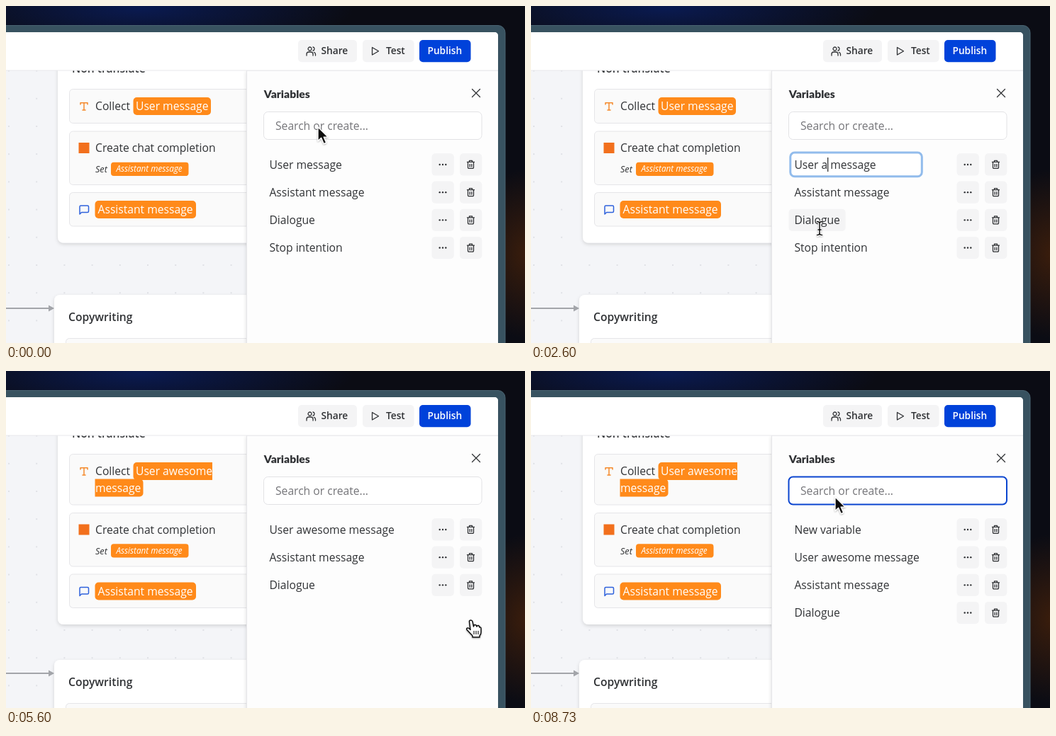
An HTML page that plays this animation: 732x476 px, repeating every 8.79 s.

```html
<!DOCTYPE html>
<html lang="en">
<head>
<meta charset="utf-8">
<title>Variables panel</title>
<style>
  html, body { margin: 0; width: 100%; height: 100%; overflow: hidden; background: #0b0c14; }
  svg { display: block; width: 100%; height: 100%; }
  text { font: 15.66px "Open Sans", sans-serif; fill: #303235; white-space: pre; }
  .bold { font-weight: 600; }
  .button { font-size: 13.7px; font-weight: 600; }
  .heading { font: 900 15.7px Lato, sans-serif; }
  .hint { fill: #757579; }
  .white { fill: #fff; }
  .set { font-size: 12.7px; font-style: italic; }
  .tag { font-size: 11.75px; font-style: italic; }
  .icon { fill: none; stroke: #303235; stroke-width: 1.3; stroke-linecap: round; stroke-linejoin: round; }
  .soft { fill: #f4f4f5; }
  .chip { fill: #ff8a1a; }
  .block { fill: #fafafa; stroke: #e5e5e8; }
  .primary { fill: #0042da; }
</style>
</head>
<body>
<svg viewBox="0 0 732 476" preserveAspectRatio="none">
  <defs>
    <radialGradient id="blueGlow">
      <stop offset="0" stop-color="#0a1a50"/>
      <stop offset="1" stop-color="#0a1a50" stop-opacity="0"/>
    </radialGradient>
    <radialGradient id="brownGlow">
      <stop offset="0" stop-color="#3a1d0c"/>
      <stop offset="1" stop-color="#3a1d0c" stop-opacity="0"/>
    </radialGradient>
    <pattern id="dots" x="3" y="365" width="39.2" height="39.2" patternUnits="userSpaceOnUse">
      <circle cx="1" cy="1" r="1" fill="#d9dbe0"/>
    </pattern>
    <clipPath id="page"><path d="M0 37H689a5 5 0 0 1 5 5V476H0z"/></clipPath>
    <filter id="shadow" x="-10%" y="-10%" width="120%" height="125%">
      <feDropShadow dx="0" dy="2" stdDeviation="2.5" flood-color="#000" flood-opacity=".14"/>
    </filter>
    <filter id="cursorShadow" x="-50%" y="-50%" width="200%" height="200%">
      <feDropShadow dx="0" dy="1" stdDeviation="1" flood-color="#000" flood-opacity=".35"/>
    </filter>
  </defs>

  <rect width="732" height="476" fill="#0b0c14"/>
  <ellipse cx="190" cy="4" rx="300" ry="60" fill="url(#blueGlow)"/>
  <ellipse cx="735" cy="350" rx="90" ry="120" fill="url(#brownGlow)"/>
  <path d="M-2 27.5H694a10 10 0 0 1 10 10V478H-2z" fill="#385260" stroke="#4a6472"/>

  <g clip-path="url(#page)">
    <rect y="37" width="694" height="439" fill="#f4f5f8"/>
    <rect y="91" width="340" height="385" fill="url(#dots)"/>
    <g id="flow"></g>
    <rect x="339.5" y="91" width="360" height="390" fill="#fdfdfd" stroke="#e6e6e9" filter="url(#shadow)"/>
    <path d="M0 37H694V91H0z" fill="#fff"/>
    <path d="M0 91H694" stroke="#e8e8eb"/>
    <g id="header"></g>
    <text class="heading" x="363.8" y="130">Variables</text>
    <path class="icon" stroke-width="1.5" d="M657.5 117.5l11 11m0 -11l-11 11"/>
    <g id="panel"></g>
  </g>
  <g id="cursor" filter="url(#cursorShadow)"></g>
</svg>

<script>
const LOOP = 8790, FRAME = 1000 / 15;
const ROW_TOP = 208.3, ROW_STEP = 39.2, BUTTON = 31.3;
const $ = id => document.getElementById(id);

const rect = (x, y, w, h, cls, r = 5, extra = '') =>
  `<rect x="${x}" y="${y}" width="${w}" height="${h}" rx="${r}" class="${cls}" ${extra}/>`;
const label = (x, y, str, cls = '') => `<text x="${x}" y="${y}" class="${cls}">${str}</text>`;
const icon = (x, y, d, extra = '') => `<path class="icon" transform="translate(${x} ${y})" d="${d}" ${extra}/>`;

const pen = document.createElement('canvas').getContext('2d');
function textWidth(str) {
  pen.font = '15.66px "Open Sans", sans-serif';
  return pen.measureText(str).width;
}

// Times of the things the user does
const CLICK_NAME = 1450, COMMIT = 3670, DELETE = 5500, FOCUS = 6450, ENTER = 8150;
const INSERT = { text: ' awesome', start: 2350, step: 135 };
const CREATE = { text: 'New variable', start: 6740, step: 105 };

const typedCount = (job, t) =>
  t < job.start ? 0 : Math.min(job.text.length, 1 + Math.floor((t - job.start) / job.step));
const lastKey = (job, t) => job.start + job.step * Math.max(0, typedCount(job, t) - 1);

function caret(x, y, t, since) {
  return (t - since) % 1060 < 530 ? `<path d="M${x} ${y - 10}v20" stroke="#222" stroke-width="1.2"/>` : '';
}

// Pointer path: start, end, from, to, easing
const inOut = p => p < .5 ? 4 * p ** 3 : 1 - (2 - 2 * p) ** 3 / 2;
const easeIn = p => p * p, easeOut = p => 1 - (1 - p) ** 3;
const MOVES = [
  [300, 1050, [440, 171], [407, 224], inOut],
  [1740, 2140, [407, 224], [407, 314], inOut],
  [3950, 4330, [407, 314], [428, 322], easeIn],
  [4330, 5050, [428, 322], [656, 352], easeOut],
  [5680, 6400, [656, 352], [427, 173], inOut],
  [8400, 8730, [427, 173], [429, 178], inOut]
];
function pointerAt(t) {
  let spot = MOVES[0][2];
  for (const [start, end, from, to, ease] of MOVES) {
    if (t < start) break;
    const p = ease(Math.min(1, (t - start) / (end - start)));
    spot = from.map((v, i) => v + (to[i] - v) * p);
  }
  return spot;
}

const at = (steps, t) => steps.filter(([time]) => time <= t).pop()[1];
const SHAPES = [[0, 'arrow'], [750, 'beam'], [3800, 'arrow'], [4800, 'hand'],
  [5680, 'arrow'], [6270, 'beam'], [8400, 'arrow']];
const HOVERS = [[0, ''], [750, 'User message'], [CLICK_NAME, ''], [1820, 'Assistant message'],
  [1880, 'Dialogue'], [4130, 'Stop intention'], [4530, '']];

const BEAM = 'M-4 -9.5Q0 -9.5 0 -7Q0 -9.5 4 -9.5M0 -7V7M-4 9.5Q0 9.5 0 7Q0 9.5 4 9.5M-2.5 2H2.5';
const CURSORS = {
  arrow: '<path d="M0 0V19.5L4.6 15.3 8.2 23.6 11.6 22.1 8.1 14.1H14z" fill="#111" stroke="#fff" stroke-width="1.3" stroke-linejoin="round"/>',
  beam: `<path d="${BEAM}" fill="none" stroke="#fff" stroke-width="3.6"/><path d="${BEAM}" fill="none" stroke="#111" stroke-width="1.5"/>`,
  hand: '<path d="M-2.5 2Q-2.5 0 -.5 0T2 2L3.5 9Q3.5 6.5 5.5 6.5T8 9Q8.3 7.3 10 7.5T11.7 10Q14 9 14 12V17Q14 20 12 22V24H2V22L-6 13.5Q-7 11.5 -5 11T-1 13.5z" fill="#fff" stroke="#111" stroke-width="1.5" stroke-linejoin="round"/><path d="M4 15v5M7 15v5M10 15v5" stroke="#111" stroke-width="1.1"/>'
};

function drawHeader() {
  $('header').innerHTML =
    rect(412, 48, 83, BUTTON, 'soft') + label(444.5, 68.3, 'Share', 'button') +
    icon(423, 57, 'M1 13v-2q0 -3 3 -3h3q3 0 3 3v2M5.5 6a2.5 2.5 0 1 1 .1 0M10 1q2 .4 2 2.5T10 6M11.5 8.3q2 .6 2 3V13') +
    rect(503, 48, 72.5, BUTTON, 'soft') + label(536, 68.3, 'Test', 'button') +
    icon(516, 58, 'M.5 .5L9.5 5.8 .5 11z') +
    rect(583, 48, 72.5, BUTTON, 'primary') + label(594.5, 68.3, 'Publish', 'button white');
}

function drawFlow(renamed) {
  const drop = renamed ? 23.5 : 0;
  const nameChip = renamed
    ? '<path class="chip" d="M291 129H184.500a5 5 0 0 0 -5 5V149a5 5 0 0 0 5 5H291z"/>' +
      '<path class="chip" d="M125.500 152.500H188.500a5 5 0 0 1 5 5V172.500a5 5 0 0 1 -5 5H125.500z"/>' +
      label(183, 147, 'User awesome', 'white') + label(126, 170.5, 'message', 'white')
    : rect(179.5, 129, 109.5, 25, 'chip') + label(183, 147, 'User message', 'white');

  $('flow').innerHTML =
    rect(73, 40, 330, 294.5 + drop, 'white', 8, 'filter="url(#shadow)"') +
    label(93, 94, 'Non translate', 'bold') +
    rect(89.5, 117.5, 300, 48 + drop, 'block') +
    icon(104.5, 136, 'M.5 3V.7H10.5V3M5.5 .7V11M3.5 11H7.500', 'style="stroke:#f58a2c;stroke-width:1.5"') +
    label(126, 147, 'Collect') + nameChip +
    `<g transform="translate(0 ${drop})">` +
    rect(89.5, 177, 300, 75.500, 'block') +
    rect(102.5, 193, 15, 15, '', 0, 'fill="#f2701d"') +
    label(126, 206, 'Create chat completion') +
    label(126, 235, 'Set', 'set') + rect(148, 220.7, 109.5, 19.3, 'chip', 4) +
    label(155.5, 234.3, 'Assistant message', 'tag white') +
    rect(89.5, 263.5, 300, 47.5, 'block') +
    icon(103.5, 281.5, 'M.5 12.500V2Q.5 .5 2 .5H11.500Q13 .5 13 2V8.500Q13 10 11.500 10H3z', 'style="stroke:#2f62dc;stroke-width:1.5"') +
    rect(125.5, 275, 142.5, 25, 'chip') + label(129.5, 293, 'Assistant message', 'white') +
    '</g>' +
    '<path d="M0 427H62" stroke="#a3a5aa" stroke-width="2"/><path d="M60 422.500L68 427 60 431.500z" fill="#a3a5aa"/>' +
    rect(68, 408, 330, 90, 'white', 8, 'filter="url(#shadow)"') +
    label(88, 445, 'Copywriting', 'bold') + rect(84.5, 469.5, 300, 40, 'block');
}

function drawSearch(t, typed) {
  const focused = t >= FOCUS, width = typed ? 261.5 : 307.5;
  const stroke = focused ? 'stroke="#0b45cf" stroke-width="2"' : 'stroke="#e2e2e5"';
  let out = rect(363.5, 149.5, width, 39, 'white', 6, stroke) +
    (typed ? label(380, 175, typed) : label(380, 175, 'Search or create...', 'hint'));
  if (focused) {
    const since = t >= ENTER ? ENTER : typed ? lastKey(CREATE, t) : FOCUS;
    out += caret(380.5 + textWidth(typed), 169, t, since);
  }
  if (typed) out += rect(632, 149, 39, 39.5, 'primary', 6) +
    '<path d="M646.500 169h10m-5 -5v10" stroke="#fff" stroke-width="1.5"/>';
  return out;
}

function drawRow(name, i, t) {
  const top = ROW_TOP + i * ROW_STEP, mid = top + BUTTON / 2;
  const editing = i === 0 && t >= CLICK_NAME && t < COMMIT;
  const trashHover = name === 'Stop intention' && t >= 4750;
  let out = '';
  if (at(HOVERS, t) === name) out += rect(363.5, top, textWidth(name) + 15.7, BUTTON, 'soft');
  if (editing) out += rect(365.8, top - 1.2, 185.5, BUTTON + 2.4, 'white', 6, 'stroke="#92bcec" stroke-width="3"');
  out += label(371.4, mid + 5.6, name);
  if (editing) {
    const n = typedCount(INSERT, t);
    const since = n ? lastKey(INSERT, t) : CLICK_NAME;
    out += caret(371.9 + textWidth('User' + INSERT.text.slice(0, n)), mid, t, since);
  }
  out += rect(600.5, top, BUTTON, BUTTON, 'soft') +
    [-4.3, 0, 4.3].map(d => `<circle cx="${616 + d}" cy="${mid}" r="1.2" fill="#303235"/>`).join('') +
    rect(640, top, BUTTON, BUTTON, 'soft', 5, trashHover ? 'style="fill:#e6e6e9"' : '') +
    icon(655.500, mid, 'M-5 -3.500H5M-4 -3.500V4Q-4 5.500 -2.500 5.500H2.500Q4 5.500 4 4V-3.500M-2 -3.500V-5.500H2V-3.500M-1.300 -.5V3M1.300 -.5V3');
  return out;
}

function drawPanel(t) {
  const first = 'User' + INSERT.text.slice(0, typedCount(INSERT, t)) + ' message';
  const typed = t < ENTER ? CREATE.text.slice(0, typedCount(CREATE, t)) : '';
  let names = [first, 'Assistant message', 'Dialogue'];
  if (t < DELETE) names.push('Stop intention');
  if (t >= ENTER) names.unshift(CREATE.text);
  names = names.filter(name => name.toLowerCase().includes(typed.toLowerCase()));
  $('panel').innerHTML = drawSearch(t, typed) + names.map((name, i) => drawRow(name, i, t)).join('');
}

function render(t) {
  drawFlow(t >= COMMIT);
  drawPanel(t);
  $('cursor').innerHTML = CURSORS[at(SHAPES, t)];
  $('cursor').setAttribute('transform', `translate(${pointerAt(t)})`);
}

let shown = -1;
const begin = performance.now();
function tick() {
  const time = (performance.now() - begin) % LOOP;
  const step = Math.floor((time + 4) / FRAME);
  if (step !== shown) {
    shown = step;
    render(step * FRAME);
  }
  requestAnimationFrame(tick);
}
drawHeader();
render(0);
tick();
</script>
</body>
</html>
```
